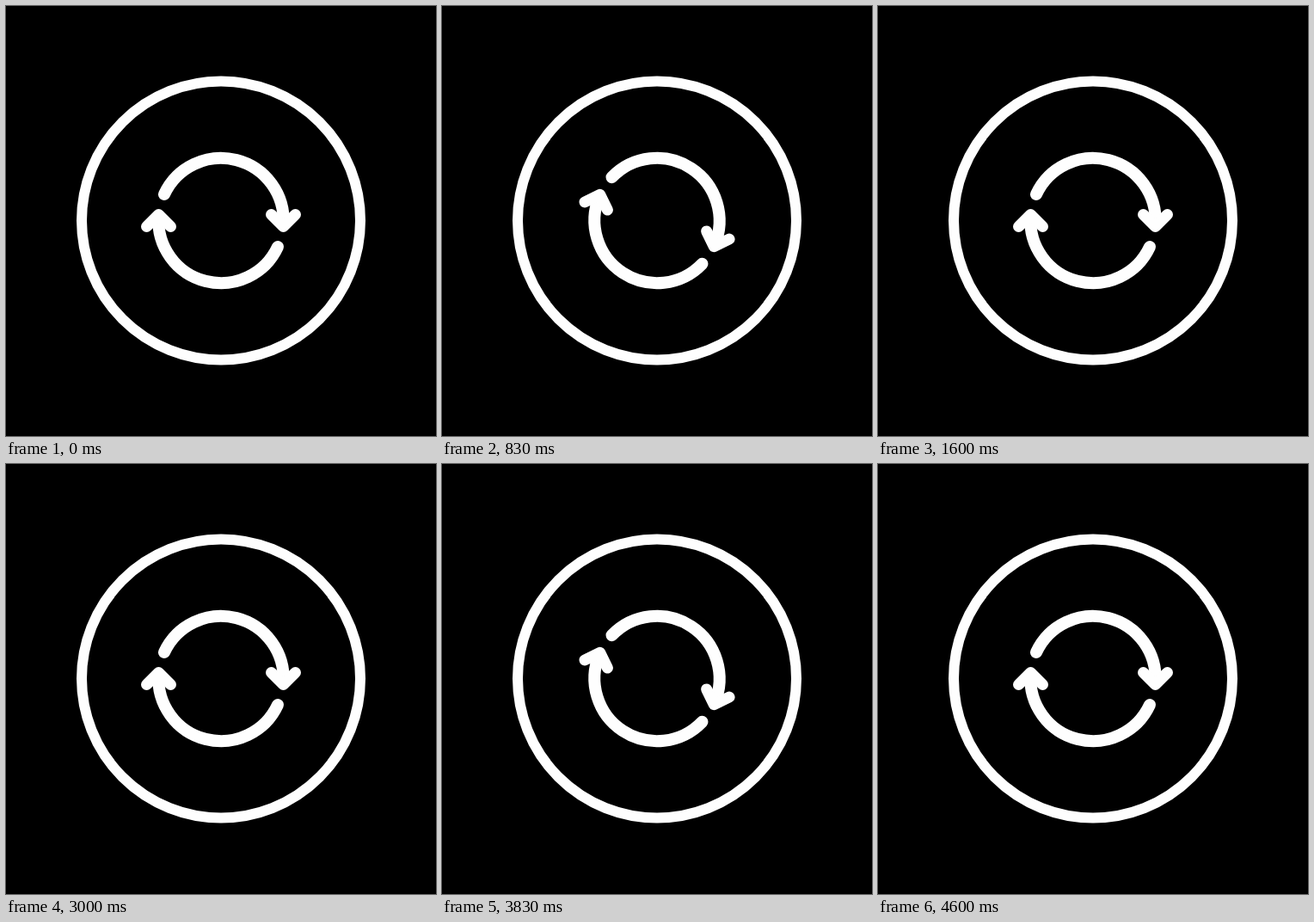
Recreate the animation shown at these times as an HTML page. Size 500x500 px, loop 6010 ms.

```html
<!DOCTYPE html>
<html lang="en">
<head>
<meta charset="utf-8">
<title>Refresh</title>
<style>
  html, body { margin: 0; width: 100%; height: 100%; overflow: hidden; background: #000; }
  svg { display: block; width: 100vw; height: 100vh; }
</style>
</head>
<body>
<svg viewBox="0 0 500 500" fill="none" stroke="#fefefe" stroke-linecap="round" stroke-linejoin="round">
  <defs>
    <g id="arrow">
      <path d="M-66 -30.5A72.7 72.7 0 0 1 72.5 5" stroke-width="14"/>
      <path d="M58.5 -7L72.5 7L86.5 -7" stroke-width="13"/>
    </g>
  </defs>
  <circle cx="250" cy="249.5" r="162" stroke-width="12"/>
  <g id="arrows">
    <use href="#arrow"/>
    <use href="#arrow" transform="rotate(180)"/>
  </g>
</svg>
<script>
const LOOP = 6010, CYCLE = 3000;
const PEAK = 410, PEAK_TIME = 1000, REST = 360, REST_TIME = 1433;
const arrows = document.getElementById('arrows');

const smooth = u => u * u * (3 - 2 * u);

// Bezier easing with control points (x1, 0) and (x2, 1)
function ease(x, x1, x2) {
  let low = 0, high = 1;
  for (let i = 0; i < 30; i++) {
    const u = (low + high) / 2, v = 1 - u;
    if (3 * x1 * v * v * u + 3 * x2 * v * u * u + u ** 3 < x) low = u;
    else high = u;
  }
  return smooth((low + high) / 2);
}

// Spin past a full turn, then settle back
function angleAt(t) {
  if (t >= REST_TIME) return 0;
  if (t < PEAK_TIME) return PEAK * ease(t / PEAK_TIME, 0.249, 0.689);
  return PEAK + (REST - PEAK) * smooth((t - PEAK_TIME) / (REST_TIME - PEAK_TIME));
}

// Poses are held alternately for 30 and 70 ms
function held(t) {
  const start = Math.floor(t / 100) * 100;
  return start + (t - start >= 30 ? 33.3 : 0);
}

function draw(ms) {
  const angle = angleAt(held((ms % LOOP) % CYCLE));
  arrows.setAttribute('transform', `translate(250 249.5) rotate(${angle.toFixed(3)})`);
}

const began = performance.now();
function tick() {
  draw(performance.now() - began);
  requestAnimationFrame(tick);
}
tick();
</script>
</body>
</html>
```
